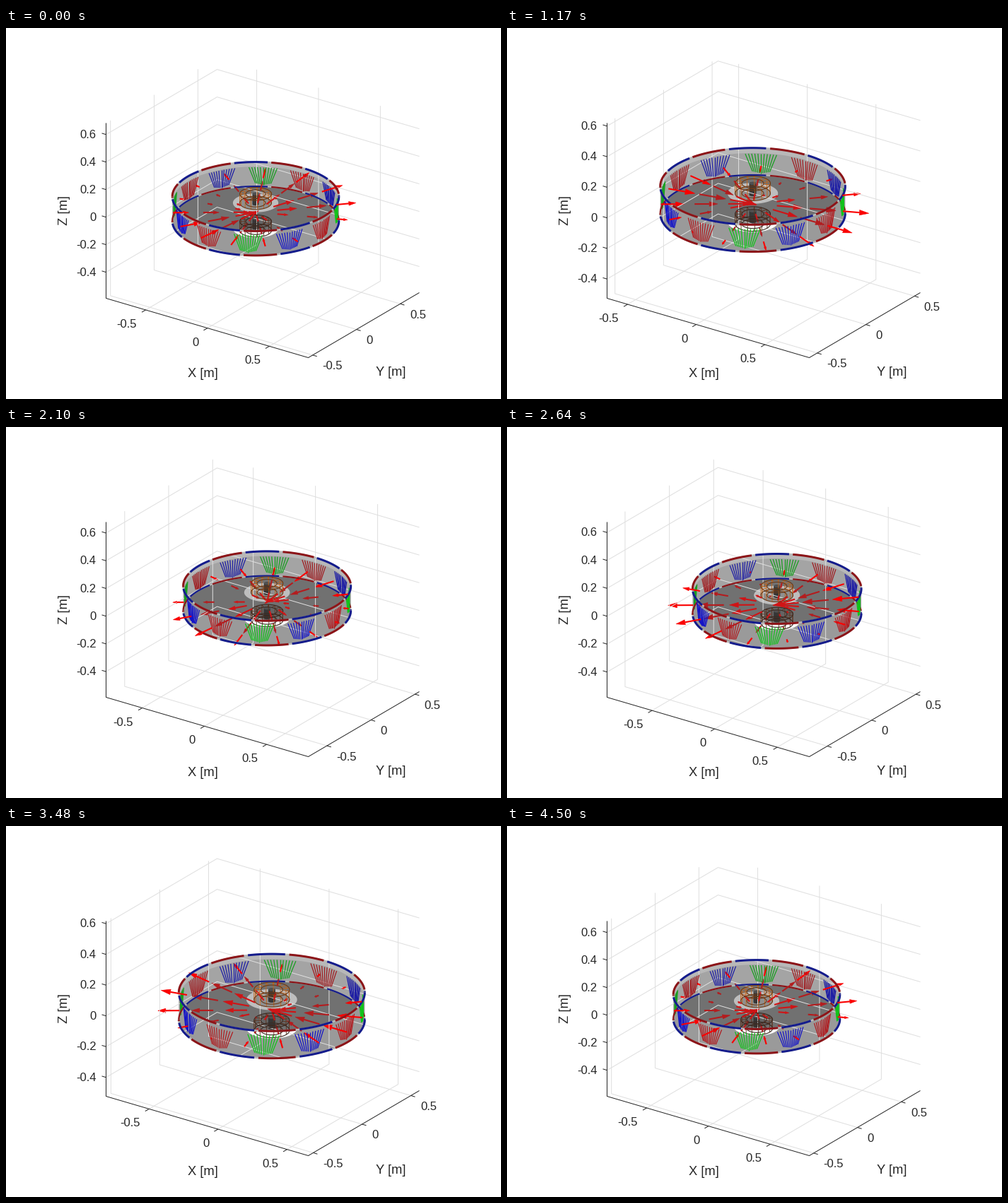
Animation, 700 px wide and 525 px high, one loop 4.53 s. Source, as a matplotlib script:

```python
import numpy as np
import matplotlib.pyplot as plt
from matplotlib.animation import FuncAnimation
from matplotlib.collections import LineCollection, PolyCollection
from matplotlib.path import Path

plt.rcParams["font.family"] = "Liberation Sans"

FRAMES, INTERVAL = 151, 30
PT = 0.72                       # points per pixel at 100 dpi
AZ, SIN_EL, COS_EL = np.radians(35.28), 0.415, 0.9098
CA, SA = np.cos(AZ), np.sin(AZ)
LEFT, FLOOR, TOP = 141, 382, 134
X_SPAN, Y_SPAN = 286, 157       # screen widths of the floor edges
INK, GRID = "#262626", "#dfdfdf"

R, Z_LOW, Z_HIGH = 0.55, -0.016, 0.161
Z_MID = 0.047
RED, BLUE = "#8c1418", "#141c8c"
RAYS = np.radians(np.arange(0, 360, 24))
TAILS = (0.146, 0.346, 0.546)
GAIN = 0.178

fig = plt.figure(figsize=(7, 5.25), dpi=100, facecolor="white")
ax = fig.add_axes([0, 0, 1, 1])


class View:
    """Fixed screen box whose data limits follow the arrow tips."""

    def __init__(self, phi):
        tip = TAILS[-1] + GAIN * np.cos(RAYS - phi)
        tx, ty = tip * np.cos(RAYS), tip * np.sin(RAYS)
        self.y0, self.y1 = min(-R, ty.min()), max(R, ty.max())
        self.s = Y_SPAN / SA / (self.y1 - self.y0)
        mid = (min(-R, tx.min()) + max(R, tx.max())) / 2
        half = X_SPAN / CA / self.s / 2
        self.x0, self.x1 = mid - half, mid + half
        half = (FLOOR - TOP) / COS_EL / self.s / 2
        self.z0, self.z1 = Z_MID - half, Z_MID + half

    def __call__(self, x, y, z):
        x, y, z = np.broadcast_arrays(x, y, z)
        dx, dy, dz = x - self.x0, y - self.y0, z - self.z0
        px = LEFT + self.s * (CA * dx + SA * dy)
        py = FLOOR + self.s * (SIN_EL * (SA * dx - CA * dy) - COS_EL * dz)
        return np.stack([px, py], axis=-1)

    def polar(self, r, a, z):
        return self(r * np.cos(a), r * np.sin(a), z)

    def circle(self, r, z, n=121):
        return self.polar(r, np.linspace(0, 2 * np.pi, n), z)


def lines(segs, color, width=1.0, **kw):
    art = LineCollection(segs, colors=color, linewidths=width * PT, **kw)
    ax.add_collection(art, autolim=False)


def fill(pts, color, clip=None, **kw):
    art = PolyCollection([pts], facecolors=color, edgecolors="none", **kw)
    ax.add_collection(art, autolim=False)
    if clip is not None:
        art.set_clip_path(Path(clip), ax.transData)


def label(x, y, text, size=12, **kw):
    ax.text(x, y, text, size=size, color=INK, **kw)


def ticks(lo, hi, step):
    k = np.arange(np.ceil(lo / step), np.floor(hi / step) + 1)
    return [(round(v * step, 1), f"{v * step:.1f}" if v else "0") for v in k]


def draw_axes(v):
    xs, ys = ticks(v.x0, v.x1, 0.5), ticks(v.y0, v.y1, 0.5)
    zs = ticks(v.z0, v.z1, 0.2)
    grid = []
    for x, _ in xs:
        grid.append([v(x, v.y0, v.z0), v(x, v.y1, v.z0), v(x, v.y1, v.z1)])
    for y, _ in ys:
        grid.append([v(v.x1, y, v.z0), v(v.x0, y, v.z0), v(v.x0, y, v.z1)])
    for z, _ in zs:
        grid.append([v(v.x0, v.y0, z), v(v.x0, v.y1, z), v(v.x1, v.y1, z)])
    lines(grid, GRID)

    marks = [[(LEFT, TOP), (LEFT, FLOOR), (427, 466), (584, 374)]]
    for x, text in xs:
        p = v(x, v.y0, v.z0)
        marks.append([p, p + (-5.5, 3.2)])
        label(p[0] - 12.5, p[1] + 25, text, ha="right")
    for y, text in ys:
        p = v(v.x1, y, v.z0)
        marks.append([p, p + (6, 1.8)])
        label(p[0] + 13.5, p[1] + 20.5, text, ha="left")
    for z, text in zs:
        p = v(v.x0, v.y0, z)
        marks.append([p, p + (-6, -1.8)])
        label(127, p[1] + 5, text, ha="right")
    lines(marks, INK)
    label(277.5, 493, "X [m]", 13.2, ha="center")
    label(543.5, 491, "Y [m]", 13.2, ha="center")
    label(82, 258, "Z [m]", 13.2, ha="center", va="center", rotation=90)


def draw_poles(v, z, side, width):
    """Alternating arcs on the half of the rim facing side (+1 back, -1 front)."""
    pitch = 2 * np.pi / 14
    a = np.linspace(0, np.pi, 61) * side + AZ
    lines([v.polar(R, a, z)], "#b9b9b9", width * 0.8)
    for color, start in ((RED, 0), (BLUE, 1)):
        segs = []
        for k in range(start, 14, 2):
            a = k * pitch + np.linspace(-0.45, 0.45, 13) * pitch
            a = a[np.sin(a - AZ) * side >= -0.02]
            if len(a) > 1:
                segs.append(v.polar(R, a, z))
        lines(segs, color, width, capstyle="butt")


def draw_fans(v, side):
    back = ("#a01c20", "#189f20", "#1c1ca4")
    front = ("#b01c20", "#10c41a", "#1414c8")
    u = np.linspace(-1, 1, 11)
    for k in range(12):
        a = k * np.pi / 6
        if np.sin(a - AZ) * side < 0:
            continue
        high = v.polar(0.54, a + u * np.radians(10), 0.128)
        low = v.polar(0.54, a + u * np.radians(5.4), 0.012 * np.abs(u))
        color = (back if side > 0 else front)[k % 3]
        lines(np.stack([high, low], axis=1), color, 1.25)


def draw_post(v, z0, z1):
    side = AZ + np.linspace(0, np.pi, 13)
    r = 0.021
    body = np.vstack([v.polar(r, side, z1), v.polar(r, side + np.pi, z0)])
    fill(body, "#363636")
    fill(v.circle(r, z1, 25), "#505050")


def draw_coil(v, z0, z1, wire, ring):
    a = np.radians(np.arange(0, 360, 24))
    loops = [np.stack([v.polar(0.065, t, z1), v.polar(0.105, t, z1),
                       v.polar(0.105, t, z0)]) for t in a]
    lines(loops, wire, 0.9)
    lines([v.circle(r, z, 61) for r in (0.065, 0.105) for z in (z0, z1)],
          ring, 1.1)


def draw_rotor(v):
    upper, lower = v.circle(R, Z_HIGH), v.circle(R, Z_LOW)
    half = np.linspace(0, np.pi, 61) + AZ
    hull = np.vstack([v.polar(R, half, Z_HIGH),
                      v.polar(R, half + np.pi, Z_LOW)])
    fill(hull, "#9a9a9a")
    fill(v.circle(0.15, -0.07), "white")
    # Inside of the ring, seen through its open top
    fill(upper, "#b8b8b8")
    band = np.vstack([v.polar(0.545, half, 0.13),
                      v.polar(0.545, half + np.pi, Z_LOW)])
    fill(band, "#a4a4a4", upper)
    fill(lower, "#717171", upper)
    draw_fans(v, 1)
    draw_poles(v, Z_LOW, 1, 2.2)
    draw_poles(v, Z_HIGH, 1, 3)

    fill(v.circle(0.105, -0.02), "#646464", upper)
    draw_coil(v, -0.085, -0.02, "#5e3420", "#3c2a22")
    draw_post(v, -0.07, 0.0)
    fill(v.circle(0.15, 0.115), "#bebebe")
    fill(v.circle(0.105, 0.115), "#8f8f8f")
    draw_coil(v, 0.115, 0.18, "#c4661c", "#6a3a18")
    draw_post(v, 0.105, 0.18)


def draw_front(v):
    draw_fans(v, -1)
    draw_poles(v, Z_LOW, -1, 3)
    draw_poles(v, Z_HIGH, -1, 3)


def draw_arrows(v, phi, radii, color):
    shafts, heads = [], []
    for r in radii:
        tip = r + GAIN * np.cos(RAYS - phi)
        for a, b in zip(v.polar(r, RAYS, Z_MID), v.polar(tip, RAYS, Z_MID)):
            d = b - a
            length = max(np.hypot(*d), 0.5)
            side = np.array([-d[1], d[0]]) / length * max(0.1 * length, 1.5)
            neck = b - 0.36 * d
            shafts.append([a, neck])
            heads.append([b, neck + side, neck - side])
    lines(shafts, color, 2.1)
    ax.add_collection(PolyCollection(heads, facecolors=color,
                                     edgecolors=color, linewidths=0.4),
                      autolim=False)


def draw(i):
    ax.clear()
    ax.set_axis_off()
    ax.set_xlim(-0.5, 699.5)
    ax.set_ylim(524.5, -0.5)
    phi = np.pi / 2 - 2 * np.pi * i / (FRAMES - 1)
    v = View(phi)
    # Equal z-orders keep the order in which things are added
    draw_axes(v)
    draw_rotor(v)
    draw_arrows(v, phi, TAILS[1:2], "#b41c1e")
    draw_arrows(v, phi, TAILS[:1], "#d01416")
    draw_front(v)
    draw_arrows(v, phi, TAILS[2:], "#fa0000")
    return []


anim = FuncAnimation(fig, draw, frames=FRAMES, interval=INTERVAL,
                     init_func=lambda: [], repeat=True, repeat_delay=0)
plt.show()
```
